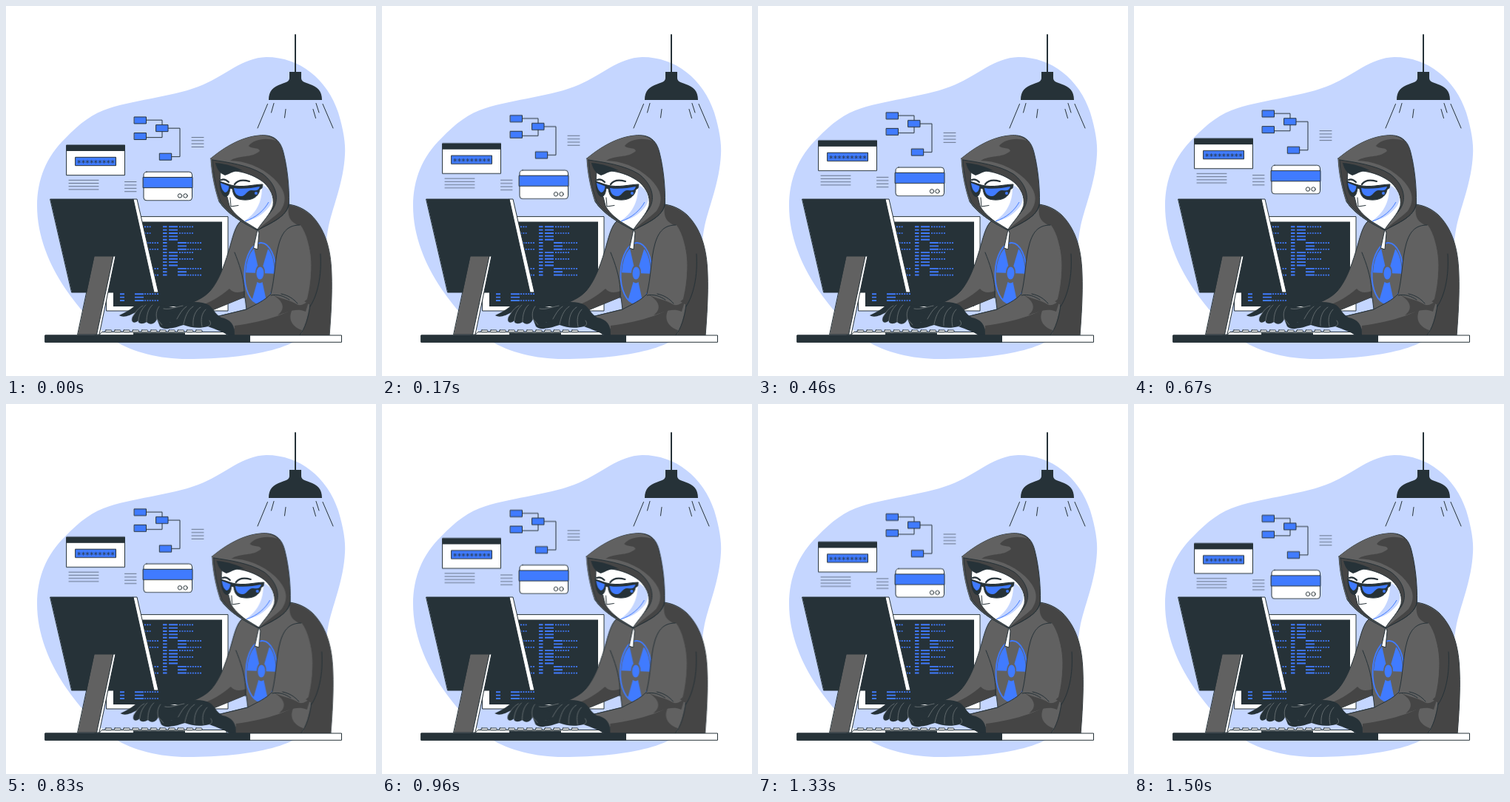
Recreate the animation shown at these times as an HTML page. Size 500 by 500 pixels, loop 1.54 s.

```html
<!DOCTYPE html>
<html lang="en">
<head>
<meta charset="utf-8">
<title>Hooded typist</title>
<style>
html, body { margin: 0; width: 100%; height: 100%; overflow: hidden; background: #fff; }
svg { display: block; width: 100%; height: 100%; }
.ink { fill: #263238; }
.blue { fill: #407bff; }
.white { fill: #fff; }
.light { fill: #616161; }
.dark { fill: #454545; }
.pale { fill: #c5d6ff; }
.edge { stroke: #263238; stroke-width: 1; stroke-linejoin: round; stroke-linecap: round; }
.line { fill: none; }
.thin { stroke-width: .6; }
.seam { fill: none; stroke: #7d8486; stroke-width: .7; stroke-linecap: round; }
.code { fill: none; stroke: #407bff; stroke-width: 1.9; }
.dots { stroke-width: 1.7; stroke-dasharray: 2 1.4; }
.float { animation: float 1540ms linear infinite; }
.shake { animation: shake 1540ms linear infinite; }
@keyframes float {
  0% { transform: translateY(-.33px); }
  47.078% { transform: translateY(-10px); }
  95.779%, 100% { transform: translateY(0); }
}
@keyframes shake {
  0% { transform: translateX(-.17px); }
  8.117%, 86.039% { transform: translateX(-1px); }
  17.857%, 76.299% { transform: translateX(2px); }
  27.597%, 47.078%, 66.558% { transform: translateX(-4px); }
  37.338%, 56.818% { transform: translateX(4px); }
  95.779%, 100% { transform: translateX(0); }
}
</style>
</head>
<body>
<svg viewBox="0 0 500 500">
  <path class="pale" d="M352 69C397 69 434 99 449 144C456 167 459 186 458 201C456 238 443 267 436 297C427 340 436 393 415 428C406 461 333 477 245 477C207 477 172 468 146 452C108 424 42 352 42 270C42 234 55 203 80 179C99 159 117 145 140 138C178 126 230 122 266 106.500C298 93 319 70 352 69Z"/>

  <g id="lamp">
    <path class="edge line" style="stroke-width:2" d="M391 39V90"/>
    <path class="ink" d="M383 89H399V97C399 102 403 103 410 105.500C421 109 427 115 427 127H355C355 115 361 109 372 105.500C379 103 383 102 383 97Z"/>
    <path class="edge line" d="M353.500 132.500L340 165M362 131.500L358.500 144M378 139.500L376.500 151M415 139.500L418.500 151.500M419 131.500L423 144M428 132.500L442 165"/>
  </g>

  <g id="back-screen">
    <path class="white edge" d="M136 284.600H300V412H136Z"/>
    <path class="ink" d="M145 291.500H292V406H145Z"/>
    <path id="bars" class="code"/>
    <path id="dots" class="code dots"/>
  </g>

  <g class="float">
    <path class="white edge" d="M82 188.500H160.500V229H82Z"/>
    <path class="ink" d="M81.500 188H161V196.300H81.500Z"/>
    <path class="blue edge" d="M94 204.700H148.500V216H94Z"/>
    <text class="ink" x="96" y="216.200" font-family="DejaVu Sans, sans-serif" font-size="11" letter-spacing=".15">*********</text>
    <path class="edge line thin" d="M85 235.700h40M85 239.900h40M85 244.100h40M85 248.300h40M160.500 237.900h15.500M160.500 242.300h15.500M160.500 246.700h15.500M160.500 251.100h15.500M251 177.900h16M251 182.200h16M251 186.500h16M251 190.800h16"/>
    <path class="edge line" d="M190 154.500H211V161M190 178H211V170M219 165.500H235V204H224"/>
    <path class="blue edge" d="M173.500 150.300h16v9h-16ZM203 161h16v9h-16ZM173.500 171.900h16v9h-16ZM207.700 199.500h16v9h-16Z"/>
    <rect class="white edge" x="186" y="224.500" width="65.500" height="38.700" rx="4"/>
    <path class="blue edge" d="M185.500 231.800H252V246H185.500Z"/>
    <g class="edge line"><circle cx="235" cy="256.800" r="2.700"/><circle cx="242.500" cy="256.800" r="2.700"/></g>
  </g>

  <g id="front-screen">
    <path class="white edge" d="M172 261H177L206 387H198Z"/>
    <path class="ink edge" d="M60 261H172L200 387H89Z"/>
    <path class="white edge" d="M143 338H148L126 444H120Z"/>
    <path class="light edge" d="M119.500 338H145L122.500 444H97Z"/>
  </g>

  <g id="keyboard">
    <path class="white edge" d="M130 440.500H298V445H126Z"/>
    <path class="ink" d="M172 441.500H242V445H172Z"/>
    <g id="keys" class="white edge"></g>
  </g>

  <g class="shake">
    <path class="light edge" d="M318 290C309 297 306 315 301 331C294 354 287 372 276 385C268 394 255 400 240 405L262 418L323 393L325 410L284 420C302 424 310 432 309 446H437C439 420 441 390 440 362C439 325 430 300 412 282C404 275 395 270 382 268L340 303Z"/>
    <path class="dark" d="M302 382C290 392 278 400 258 407L264 417L323 393V385C314 388 307 388 302 382Z"/>
    <path class="dark" d="M382 269C395 271 404 276 412 283C430 300 439 325 440 362C441 390 439 420 437 446H398C404 435 408 420 411 404C405 400 398 396 391 392C404 391 408 386 410 378C415 350 414 318 394 296C385 291 380 286 382 269Z"/>
    <path class="dark" d="M309 430C336 428 365 421 387 410C380 424 388 434 400 438L398 446H309Z"/>
    <path class="edge line" d="M309 333C315 348 321 365 322 383V395"/>

    <g id="emblem" transform="rotate(2 343.500 361)">
      <ellipse class="code" cx="343.500" cy="361" rx="21" ry="41"/>
      <ellipse class="blue" cx="343.500" cy="361" rx="5" ry="8.500"/>
      <path class="blue" d="M324 361A19.500 38 0 0 1 334 328L340 351Q337 355 337 361ZM353 328A19.500 38 0 0 1 363 361H350Q350 355 347 351ZM334 397A19.500 38 0 0 0 353 397L347 373Q343.500 376 340 373Z"/>
    </g>

    <path class="light" d="M398 296C382 296 374 304 369 321C363 342 364 365 358 389C350 398 338 403 325 410L284 420C300 424 307 427 309 432C350 427 390 414 407 396C415 367 415 319 398 296Z"/>
    <path class="dark" d="M360 390C372 396 383 397 393 403C398 406 404 403 410 397L405 413C391 407 379 415 367 418C378 410 376 399 360 390Z"/>
    <path class="edge line" d="M397 296C382 296 374 304 369 321C363 342 364 365 358 389C350 398 338 403 325 410L284 420M358 391C367 389 376 392 383 397M372 389C382 391 389 396 394 402M425 335C427 365 421 391 411 406M411 404C409 421 404 436 397 445"/>

    <g id="head">
      <path class="dark edge" d="M277 206C278 228 283 249 288 264C299 281 320 293 340 303C358 293 380 285 382.500 267C383 244 380 217 375 198C371 181 361 173 342 175C319 177 296 190 277 206Z"/>
      <path class="light" d="M277 206C296 190 319 177 342 175C352 174 360 177 365 182C350 177 334 181 328 189C332 194 342 190 343 196C332 206 315 201 303 209C322 209 345 217 362 233C376 247 382 261 371 277C362 286 350 293 340 303C320 293 299 281 288 264C283 249 278 228 277 206Z"/>
      <path class="dark edge" d="M279 208C299 211 328 215 347 227C363 239 371 258 361 274C355 283 346 291 340 301C320 291 302 281 290 264C284 248 280 227 279 208Z"/>
      <path class="white edge" d="M290 224C309 219 335 227 349 239C357 247 363 257 361 270C357 282 347 291 340 302L322 291C314 285 306 278 302 270L299 258C291 255 288 246 290 224Z"/>
      <path class="pale" d="M346 242C358 246 364 260 356 271C347 282 336 289 322 291C337 281 347 266 346 242Z"/>
      <path class="line" stroke="#407bff" d="M355 265C349 276 338 286 323 291"/>
      <path class="ink" d="M283 212C298 213 311 218 322 223C310 221 305 226 296 229C290 226 286 223 283 212Z"/>
      <path class="edge line" style="stroke-width:2.200" d="M309 241C314 234 322 235 329 237M291 235C295 233 298 235 301 238"/>
      <path class="edge line" d="M303 259L304 271L314 269.500"/>
      <path class="ink edge" d="M289 237L304 242C320 246 335 241 347 241L346 246L343 248C341 261 327 264 315 261C309 259 307 254 306 247L303 246C302 256 298 261 293 255C290 250 289 244 289 237Z"/>
      <path class="blue" d="M290 239L301.500 243.500C301 249 299 252 296 252C292 249 291 245 290 239ZM308 246C319 248 333 246 343 244C341 251 337 249 332 249C325 249 324 258 317 257C310 256 309 251 308 246Z"/>
      <circle class="blue" cx="338" cy="253" r="2"/>
      <path class="edge line" d="M382.500 267C380 285 358 293 340 303C320 293 299 281 288 264"/>
      <path class="white edge" d="M340 302L334.500 327L340 329L342 307Z"/>
    </g>

    <g id="hands">
      <path class="ink" d="M153 418C161 414 167 411 173 406C182 399 200 400 209 404L226 407L244 405L232 425L221 428C226 438 214 438 208 433L204 423C201 431 194 431 190 427C184 431 178 429 179 425C174 430 168 428 171 420L175 414C168 418 159 422 153 418Z"/>
      <path class="seam" d="M175 414C178 410 181 407 185 405M179 425C180 416 183 410 189 404M190 427C190 418 192 409 198 404M204 423C202 416 204 410 207 406M171 420L175 414M211 431L204 423"/>
      <path class="ink" d="M209 433C218 427 225 428 231 423L234 415C226 416 217 414 213 409C222 409 230 407 238 403C249 399 265 399 274 404C281 409 283 417 291 421C303 423 310 431 309 445H300C293 440 283 437 273 433C262 436 250 435 240 431C230 434 218 439 209 433Z"/>
      <path class="seam" d="M213 409C222 411 232 406 239 405M231 423C235 416 238 410 244 406M240 430C242 421 245 411 253 406M253 432C252 421 256 411 263 407M265 433C263 424 264 416 270 410M273 433C278 431 277 428 275 425"/>
    </g>
  </g>

  <path class="white edge" d="M53 445H453.500V454.300H53Z"/>
  <path class="ink" d="M53 444.500H330V454.800H53Z"/>
</svg>
<script>
const el = id => document.getElementById(id);
const rowY = i => 298.3 + i * 4.35;
let bars = '', dots = '';
const bar = (x, y, w) => { bars += `M${x} ${y}h${w}`; };
const dot = (x, y, w) => { dots += `M${x} ${y}h${w}`; };

// blocks of five plain rows and three indented ones
for (let i = 0; i < 16; i++) {
  const y = rowY(i);
  const row = i % 8;
  const inset = row > 4;
  const x = inset ? 232 : 220;
  const dotted = [0, 2, 5, 7].includes(row);
  bar(212, y, 5.5);
  bar(x, y, 12);
  if (dotted) {
    dot(x + (inset ? 13 : 14), y, 19);
    dot(187, y, inset ? 19 : i < 8 ? 8.5 : 0);
  }
}
for (let i = 0; i < 3; i++) {
  const y = 389.2 + i * 4.4;
  bar(154, y, 6);
  bar(174, y, 12);
  if (i !== 1) dot(187, y, 19);
}
el('bars').setAttribute('d', bars);
el('dots').setAttribute('d', dots);

let keys = '';
for (let i = 0; i < 11; i++) {
  keys += `<rect x="${134 + i * 12.2}" y="438" width="9" height="2.800" rx="1"/>`;
}
el('keys').innerHTML = keys;
</script>
</body>
</html>
```
